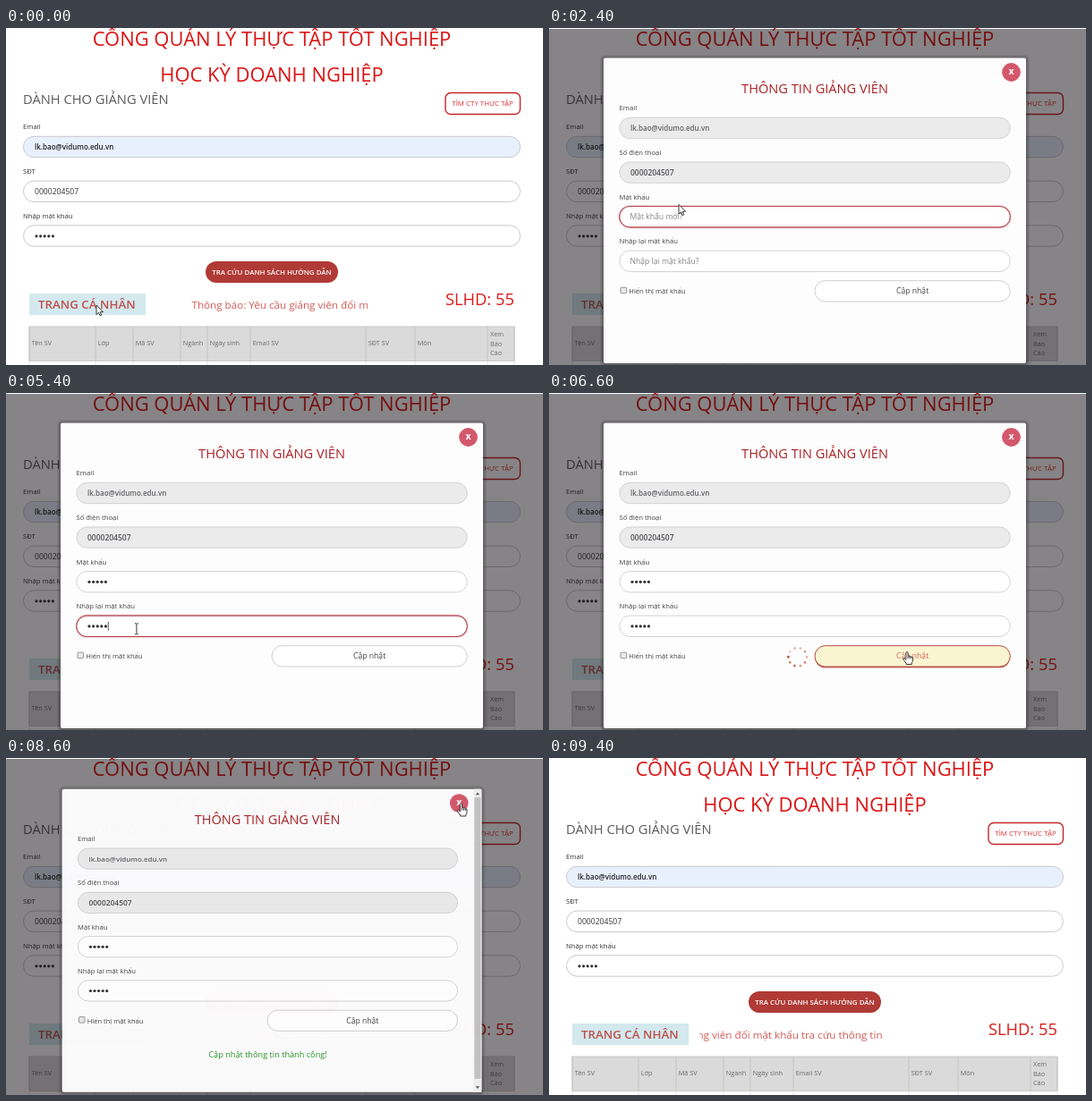
An HTML page that plays this animation: 600 px wide and 377 px high, repeating every 9.5 s.

```html
<!DOCTYPE html>
<html lang="vi">
<head>
<meta charset="utf-8">
<title>Trang cá nhân</title>
<style>
html, body { margin: 0; width: 100%; height: 100%; overflow: hidden; background: #fff; }
svg { display: block; width: 100vw; height: 100vh; }
text { font-family: "Open Sans", "Noto Sans", sans-serif; white-space: pre; }
</style>
</head>
<body>
<svg id="stage" viewBox="0 0 600 377"></svg>
<script>
const LOOP = 9500;
const EMAIL = 'lk.bao@vidumo.edu.vn', PHONE = '0000204507';
const stage = document.getElementById('stage');

function set(el, attrs) {
  for (const k in attrs) el.setAttribute(k, attrs[k]);
  return el;
}
function add(parent, tag, attrs) {
  return parent.appendChild(set(document.createElementNS('http://www.w3.org/2000/svg', tag), attrs));
}
const group = (parent, attrs = {}) => add(parent, 'g', attrs);
function text(parent, str, x, y, size, fill, more = {}) {
  const el = add(parent, 'text', { x, y, 'font-size': size, fill, ...more });
  el.textContent = str;
  return el;
}
function box(parent, x, y, width, height, rx, fill, stroke = 'none', more = {}) {
  return add(parent, 'rect', { x, y, width, height, rx, fill, stroke, ...more });
}
function dots(parent, x, y) {
  return [0, 1, 2, 3, 4].map(i => add(parent, 'circle', { cx: x + i * 4.6, cy: y, r: 1.6, fill: '#333' }));
}
const show = (el, on) => el.setAttribute('visibility', on ? 'inherit' : 'hidden');
const clamp = v => Math.max(0, Math.min(1, v));
const mid = { 'text-anchor': 'middle' }, semi = { 'font-weight': 600 }, medium = { 'font-weight': 500 };

// Page
const page = group(stage);
box(page, 0, 0, 600, 377, 0, '#fff');
text(page, 'CỔNG QUẢN LÝ THỰC TẬP TỐT NGHIỆP', 297, 19.5, 21.95, '#dc1414', mid);
text(page, 'HỌC KỲ DOANH NGHIỆP', 297, 60, 21.95, '#dc1414', mid);
text(page, 'DÀNH CHO GIẢNG VIÊN', 19, 85, 14.7, '#5a5a5a');
box(page, 491, 72.5, 83.5, 24, 6, '#fff', '#c5262b', { 'stroke-width': 1.4 });
text(page, 'TÌM CTY THỰC TẬP', 532.5, 87.3, 7.9, '#dc3030', mid);

[['Email', 113, '#e8f0fe'], ['SĐT', 162.8, '#fff'], ['Nhập mật khẩu', 212.5, '#fff']].forEach(([label, y, fill]) => {
  text(page, label, 19, y, 7.7, '#333', medium);
  box(page, 19.5, y + 8.3, 555, 23.4, 11.7, fill, '#c4c4c8', { 'stroke-width': .9 });
});
text(page, EMAIL, 32, 136, 8, '#222', semi);
text(page, PHONE, 32, 185.8, 8.6, '#333');
dots(page, 34, 232.8);

box(page, 223, 261, 148, 24, 12, '#b03a36');
text(page, 'TRA CỨU DANH SÁCH HƯỚNG DẪN', 297, 275.8, 7.9, '#fff', { ...mid, ...semi });
box(page, 26, 297, 130, 24, 0, '#d3e9ee');
const profile = text(page, 'TRANG CÁ NHÂN', 36, 314, 13.3, '#c0504c', semi);
text(page, 'SLHD: 55', 491, 309.5, 18.3, '#dc1a1a');

const clip = add(page, 'clipPath', { id: 'ticker' });
box(clip, 168, 295, 236, 30, 0, '#000');
const ticker = text(group(page, { 'clip-path': 'url(#ticker)' }),
  'Thông báo: Yêu cầu giảng viên đổi mật khẩu tra cứu thông tin', 0, 313.5, 11.65, '#d25a55');

box(page, 26, 334, 542, 38.5, 0, '#dadada', '#c2c2c2', { 'stroke-width': .8 });
[26, 100, 142, 195, 225, 273, 402, 457, 538, 568].forEach((x, i) => {
  add(page, 'path', { d: `M${x} 334V372`, stroke: '#bfbfbf', 'stroke-width': .8 });
  add(page, 'path', { d: `M${x} 373V377`, stroke: '#dedede', 'stroke-width': .8 });
  const name = ['Tên SV', 'Lớp', 'Mã SV', 'Ngành', 'Ngày sinh', 'Email SV', 'SĐT SV', 'Môn'][i];
  if (name) text(page, name, x + 2.7, 355.3, 7.3, '#6a6a6a');
});
['Xem', 'Báo', 'Cáo'].forEach((s, i) => text(page, s, 541, 345 + i * 10.5, 7.3, '#6a6a6a'));

const shade = box(stage, 0, 1, 600, 376, 0, '#0e0b0e');

// Dialog
const modal = group(stage);
for (let i = 1; i <= 4; i++) box(modal, 61 - i, 34 - i, 472 + 2 * i, 341.5 + 2 * i, 2 + i, '#000', 'none', { opacity: .07 });
box(modal, 61, 33.5, 472, 341.5, 2, '#fefdfe');
const close = group(modal);
add(close, 'circle', { cx: 516.5, cy: 49.5, r: 10.4, fill: '#d4586b' });
text(close, 'x', 516.5, 52.4, 10.5, '#fff', { ...mid, 'font-weight': 700 });

const form = group(modal);
const heading = text(form, 'THÔNG TIN GIẢNG VIÊN', 297, 73, 14.6, '#a82024', mid);
const fields = ['Email', 'Số điện thoại', 'Mật khẩu', 'Nhập lại mật khẩu'].map((label, i) => {
  const y = 100.3 + i * 49.6;
  text(form, label, 78.5, y - 8, 7.7, '#444', medium);
  const bar = (fill, stroke, width, opacity) =>
    box(form, 78.8, y, 436.5, 23.4, 11.7, fill, stroke, { 'stroke-width': width, opacity });
  const glow = bar('none', '#d98a92', 3, 0);
  const frame = bar(i < 2 ? '#ebebec' : '#fff', '#cfcfd4', .9, 1);
  const ring = bar('none', '#b9474f', 1.1, 0);
  return { y, glow, ring, parts: [glow, frame, ring] };
});
text(form, EMAIL, 91, 115, 8, '#626266', semi);
text(form, PHONE, 91, 164.6, 8.5, '#505054', semi);

function secret(field, hint, focus, blur, typed) {
  const y = field.y + 11.8;
  const holder = text(form, hint, 90.5, y + 3, 8.6, '#858589');
  const marks = dots(form, 93, y);
  const caret = box(form, 90.8, y - 5, .8, 10, 0, '#333');
  return t => {
    const n = Math.max(0, Math.min(5, Math.floor((t - typed) / 190) + 1));
    const on = clamp((t - focus) / 150) * clamp(1 - (t - blur) / 200);
    show(holder, n === 0);
    marks.forEach((m, i) => show(m, i < n));
    set(field.ring, { opacity: on });
    set(field.glow, { opacity: on * .35 });
    set(caret, { x: 90.8 + n * 4.6 });
    show(caret, t > focus && t < blur && (t - focus) % 1000 < 500);
  };
}
const secrets = [
  secret(fields[2], 'Mật khẩu mới?', 1800, 4190, 2800),
  secret(fields[3], 'Nhập lại mật khẩu?', 4190, 6250, 4550)
];

box(form, 80, 290.2, 6.6, 6.6, 1, '#e9e9ea', '#8a8a8a', { 'stroke-width': .9 });
text(form, 'Hiển thị mật khẩu', 89.3, 297.2, 7.6, '#444', medium);
const lift = box(form, 297, 284, 218.5, 23.6, 11.8, '#a9443f');
const submit = box(form, 297, 282.7, 218.5, 23.4, 11.7, '#fff');
const submitText = text(form, 'Cập nhật', 406, 297.4, 8.6, '#444', { ...mid, ...medium });
const done = text(form, 'Cập nhật thông tin thành công!', 292.5, 336.3, 9.25, '#279427', mid);

const spinner = group(form);
for (let i = 0; i < 10; i++) {
  const a = i * Math.PI / 5;
  add(spinner, 'circle', {
    cx: 10.3 * Math.cos(a), cy: 10.3 * Math.sin(a), r: 1.1 + i * .04,
    fill: i % 2 ? '#b5533f' : '#d98458', opacity: .55 + i * .045
  });
}

const bar = group(modal);
box(bar, 524, 33.5, 9, 341.5, 0, '#f0f0f0');
box(bar, 525, 43, 7, 317, 0, '#c3c3c3');
add(bar, 'path', { d: 'M526.3 40l2.2-2.6 2.2 2.6zM526.3 368.5l2.2 2.6 2.2-2.6z', fill: '#555' });

// Pointers, each with its hot spot at 0,0
const pointer = group(stage);
const shapes = {
  arrow: add(pointer, 'path', { d: 'M0 0V10.6L2.5 8.3 4.1 12 5.8 11.2 4.2 7.7H7.6Z' }),
  hand: add(pointer, 'path', {
    d: 'M-1.1 .8Q0 -.6 1.1 .8V4.8Q2.2 4 3 5.2 4.2 4.5 4.9 5.7 6.4 5.2 6.5 7V9.6Q6.3 11.3 5.3 12.3V14H-.9V12.8L-4 8.8Q-4.5 7.2-3 7.2L-1.1 8.9ZM1.1 5V7.5M3 5.4V7.7M4.9 6V7.9'
  }),
  beam: add(pointer, 'path', { d: 'M-2 -6H-.6L0 -5.4 .6 -6H2M0 -5.4V5.4M-2 6H-.6L0 5.4 .6 6H2' })
};
for (const k in shapes) set(shapes[k], { fill: k === 'beam' ? 'none' : '#fff', stroke: '#222', 'stroke-width': .9, 'stroke-linejoin': 'round' });

const route = [
  [0, 101, 310], [1250, 101, 310], [2150, 145, 197.5], [3550, 145, 197.5], [4000, 142.5, 263.5],
  [5350, 142.5, 263.5], [6100, 400, 289.5], [7550, 400, 289.5], [8300, 508.5, 51],
  [8780, 508.5, 51], [9050, 612, -20], [LOOP, 612, -20]
];
function movePointer(t) {
  const i = route.findIndex(p => p[0] > t);
  const [t0, x0, y0] = route[i - 1], [t1, x1, y1] = route[i];
  const p = (t - t0) / (t1 - t0), e = p * p * (3 - 2 * p);
  set(pointer, { transform: `translate(${x0 + (x1 - x0) * e} ${y0 + (y1 - y0) * e})` });
  const inside = (a, b) => t >= a && t < b;
  const kind = inside(3780, 5450) ? 'beam'
    : inside(200, 950) || inside(5950, 7650) || inside(8220, 8850) ? 'hand' : 'arrow';
  for (const k in shapes) show(shapes[k], k === kind);
}

function layout(long) {
  const end = long ? 506 : 515.3, left = long ? 292 : 297;
  fields.forEach(f => f.parts.forEach(r => set(r, { width: end - 78.8 })));
  [lift, submit].forEach(r => set(r, { x: left, width: end - left }));
  set(submitText, { x: (left + end) / 2 });
  set(heading, { x: left });
  set(close, { transform: `translate(${long ? -8.8 : 0} 0)` });
  show(bar, long);
  show(done, long);
}

function render(t) {
  const a = clamp((t - 280) / 385), b = clamp((t - 8540) / 400);
  const open = (1 - (1 - a) ** 2) * (1 - b * b);
  const scale = .7 + .3 * open;
  set(shade, { opacity: .5 * Math.min(1, open * 1.05) });
  set(modal, { opacity: open, transform: `translate(297 204) scale(${scale}) translate(-297 -204)` });
  show(modal, open > 0);
  show(form, t > 900);
  layout(t >= 7300);
  secrets.forEach(f => f(t));

  const hover = clamp((t - 5950) / 150) * clamp(1 - (t - 7620) / 150);
  const mix = (c, d) => `rgb(${c.map((v, i) => Math.round(v + (d[i] - v) * hover))})`;
  set(submit, { fill: mix([255, 255, 255], [249, 245, 208]), stroke: mix([207, 207, 212], [190, 72, 66]) });
  set(submitText, { fill: mix([68, 68, 68], [217, 100, 92]) });
  set(lift, { opacity: hover * .8 });

  show(spinner, t >= 6350 && t < 7300);
  set(spinner, { transform: `translate(277.7 295.3) rotate(${(t * .36) % 360})` });
  set(profile, { fill: t >= 200 && t < 950 ? '#333' : '#c0504c' });
  set(ticker, { x: t < 5000 ? 207.5 - t * .059 : 41 + (9400 - t) * .059 });
  movePointer(t);
}

const start = performance.now();
function tick() {
  render((performance.now() - start) % LOOP);
  requestAnimationFrame(tick);
}
tick();
</script>
</body>
</html>
```
